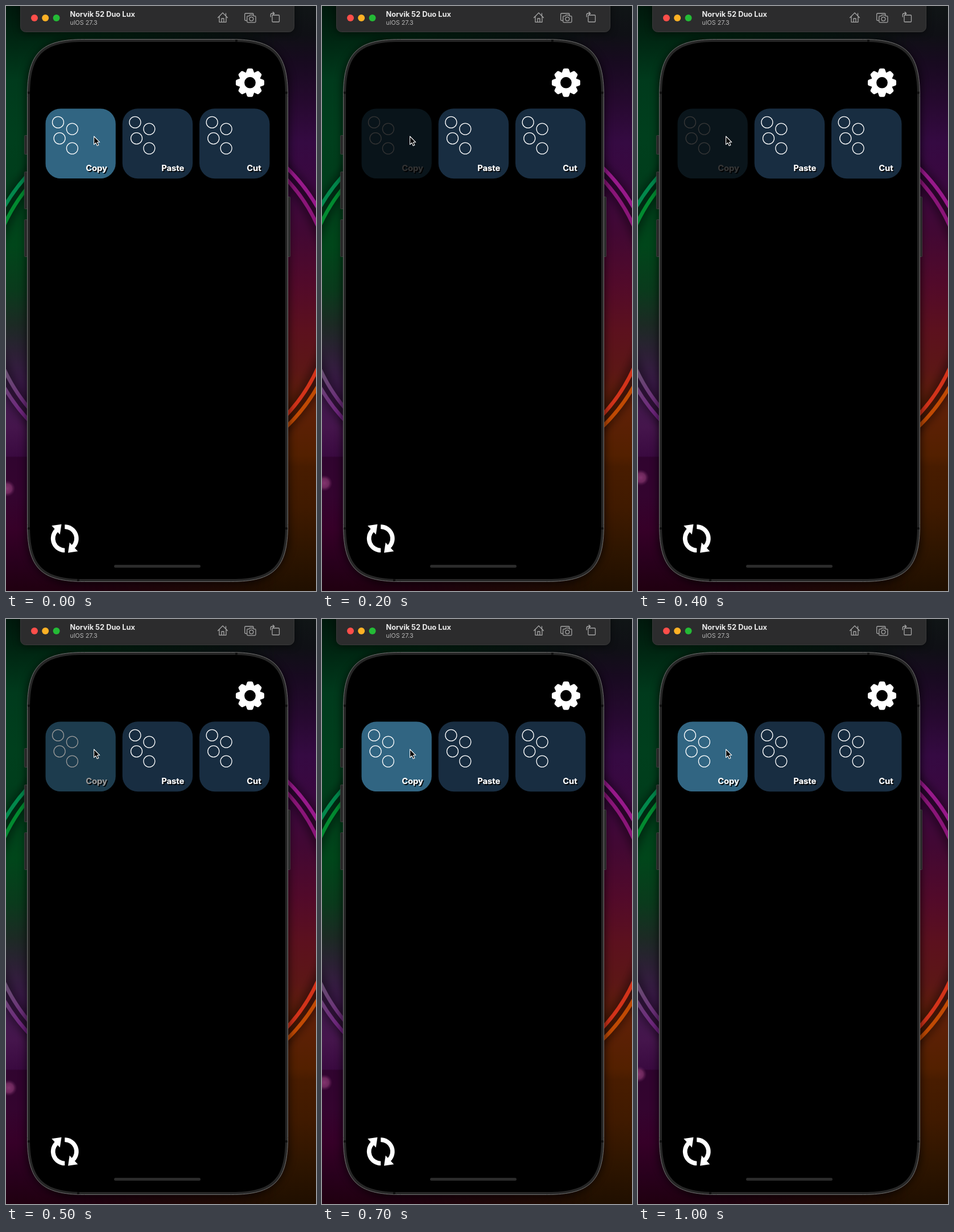
An HTML page that plays this animation: 545x1028 px, repeating every 1100 ms.

```html
<!DOCTYPE html>
<html lang="en">
<head>
<meta charset="utf-8">
<title>Simulator</title>
<style>
  html, body { margin: 0; width: 100%; height: 100%; overflow: hidden; background: #000; }
  .stage { position: relative; width: 545px; height: 1028px; overflow: hidden; }
  .stage > * { position: absolute; inset: 0; }
  .cool {
    background: linear-gradient(#00180c, #002411 50px, #003a1c 130px, #003f1d 230px, #003d1b 320px,
      #00461a 420px, #0a3a1c 500px, #1c2a24 560px, #2c2035 610px, #3e1a4c 670px, #45154c 740px,
      #3a0a40 791px, #30042f 793px, #34042f 860px, #360028 920px, #28001c 980px, #200010);
  }
  .warm {
    background: linear-gradient(#101516, #0f1015 50px, #180a20 100px, #26092f 170px, #350a42 240px,
      #3a0840 310px, #420833 400px, #520a2a 490px, #5c111e 570px, #5c1716 640px, #602008 700px,
      #532000 790px, #481c00 810px, #401a00 880px, #2e1500 960px, #200f00);
    -webkit-mask-image: linear-gradient(90deg, transparent 25%, #000 88%);
    mask-image: linear-gradient(90deg, transparent 25%, #000 88%);
  }
  text { font-family: Inter, "Noto Sans", sans-serif; }
  .label { font-size: 14.7px; font-weight: 700; fill: #fff; text-anchor: end; }
  .icon { fill: none; stroke: #a6a6a6; stroke-width: 1.3; stroke-linejoin: round; stroke-linecap: round; }

  .press { animation: press 1.1s step-end infinite; }
  .rise  { animation: rise 1.1s steps(11) infinite; }
  .sway  { animation: sway 1.1s step-end infinite; }

  @keyframes press {
    0%     { opacity: 1; }
    9.09%  { opacity: .5; }
    18.18% { opacity: .2; }
    36.36% { opacity: .215; }
    45.45% { opacity: .6; }
    54.54% { opacity: .98; }
    63.63% { opacity: 1; }
  }
  @keyframes rise { to { transform: translateY(-52.8px); } }
  @keyframes sway {
    0%     { transform: none; }
    9.09%  { transform: translateX(1.2px); }
    18.18% { transform: translateX(2px); }
    36.36% { transform: translateX(3px); }
    63.63% { transform: translateX(2px); }
    72.72% { transform: translateX(1.2px); }
    81.81% { transform: none; }
    90.9%  { transform: translateX(-1px); }
  }
</style>
</head>
<body>
<div class="stage">
  <div class="cool"></div>
  <div class="warm"></div>
  <svg width="545" height="1028" viewBox="0 0 545 1028">
    <defs>
      <filter id="soft" x="-20%" y="-20%" width="140%" height="140%"><feGaussianBlur stdDeviation="7"/></filter>
      <filter id="drop" x="-20%" y="-20%" width="150%" height="160%">
        <feDropShadow dx="1.8" dy="1.8" stdDeviation=".5" flood-color="#000"/>
      </filter>
      <radialGradient id="glow">
        <stop offset="0" stop-color="#8c3a76" stop-opacity=".9"/>
        <stop offset=".55" stop-color="#82356c" stop-opacity=".75"/>
        <stop offset="1" stop-color="#5c1c54" stop-opacity="0"/>
      </radialGradient>
      <linearGradient id="violet" gradientUnits="userSpaceOnUse" x1="0" y1="635" x2="36" y2="725">
        <stop offset="0" stop-color="#66506f"/><stop offset="1" stop-color="#702080"/>
      </linearGradient>
      <g id="dots" fill="none" stroke="#fff" stroke-width="1.3">
        <circle cx="22.2" cy="24.2" r="10"/>
        <circle cx="47.1" cy="35.9" r="10"/>
        <circle cx="24.8" cy="52.4" r="10"/>
        <circle cx="47.1" cy="69.9" r="10"/>
      </g>
      <rect id="tile" width="123.5" height="123" rx="27"/>
      <path id="tooth" d="M-7.6,-16.5 L-5.2,-23.2 Q-4.6,-25 -2.8,-25 H2.8 Q4.6,-25 5.2,-23.2 L7.6,-16.5 Z"/>
      <g id="turn">
        <path d="M0,20.7 A20.7,20.7 0 0 1 -14.6,-14.6" fill="none" stroke="#fff" stroke-width="7.6"/>
        <path d="M-23,-22.5 L-5.8,-25 L-8.5,-7 Z" fill="#fff"/>
      </g>
    </defs>

    <!-- neon rings, seen only beside the phone -->
    <circle cx="272" cy="511.5" r="309" fill="none" stroke="#000" stroke-opacity=".35" stroke-width="34" filter="url(#soft)"/>
    <g fill="none" stroke-width="6.5" transform="translate(272 511.5)">
      <path d="M-317.5,0 A317.5,317.5 0 0 1 0,-317.5" stroke="#02884c"/>
      <path d="M-303,0 A303,303 0 0 1 0,-303" stroke="#028a30"/>
      <path d="M0,-317.5 A317.5,317.5 0 0 1 317.5,0" stroke="#97198a"/>
      <path d="M0,-303 A303,303 0 0 1 303,0" stroke="#8a1578"/>
      <path d="M317.5,0 A317.5,317.5 0 0 1 0,317.5" stroke="#c04a04"/>
      <path d="M303,0 A303,303 0 0 1 0,303" stroke="#d2331a"/>
    </g>
    <path d="M272,829 A317.5,317.5 0 0 1 -45.5,511.5 M272,814.5 A303,303 0 0 1 -31,511.5" fill="none" stroke="url(#violet)" stroke-width="6.5"/>

    <g class="rise"><circle class="sway" cx="2" cy="848" r="14.5" fill="url(#glow)"/></g>

    <!-- toolbar -->
    <rect x="25" y="-14" width="482" height="62" rx="10" fill="#000" opacity=".5" filter="url(#soft)"/>
    <rect x="25.5" y="-20" width="481" height="65.5" rx="9" fill="#2c2c2d" stroke="#3a3a3a"/>
    <circle cx="50" cy="21" r="6" fill="#fe4e4a"/>
    <circle cx="69.2" cy="21" r="6" fill="#fdb125"/>
    <circle cx="88.6" cy="21" r="6" fill="#24bb36"/>
    <text x="112.5" y="19.4" font-size="12.8" font-weight="700" fill="#ececec">Norvik 52 Duo Lux</text>
    <text x="112.5" y="33" font-size="10.8" fill="#b6b6b6">ulOS 27.3</text>
    <g class="icon">
      <path d="M372.5,20.5 L381,12 L389.5,20.5 M375,18.5 V28.3 H387 V18.5 M379,28 V22 H383 V28 M386.5,17 V13"/>
      <path d="M422.5,25.5 H421 Q419.7,25.5 419.7,24 V14.5 Q419.7,13 421.2,13 H433.5 Q435,13 435,14.5 V16"/>
      <path d="M425.2,17.6 H427.5 L428.8,15.8 H434 L435.3,17.6 H437.6 Q439,17.6 439,19 V27.3 Q439,28.8 437.6,28.8 H425.2 Q423.8,28.8 423.8,27.3 V19 Q423.8,17.6 425.2,17.6 Z"/>
      <circle cx="431.4" cy="22.8" r="3.4"/>
      <rect x="468" y="16" width="12.5" height="12" rx="1.2"/>
      <path d="M465.3,19 V15.5 Q465.3,13 468,13 H471.5 M469.2,10.6 L471.8,13 L469.2,15.4"/>
    </g>

    <!-- phone body -->
    <rect x="35" y="58" width="463" height="958" rx="80" fill="#000" opacity=".6" filter="url(#soft)"/>
    <g fill="#272727" stroke="#454545" stroke-width=".8">
      <rect x="32.4" y="227.5" width="7" height="33" rx="1"/>
      <rect x="32.4" y="291.5" width="7" height="65" rx="1"/>
      <rect x="32.4" y="375.5" width="7" height="65" rx="1"/>
      <rect x="492" y="335.5" width="7.6" height="105" rx="1"/>
    </g>
    <!-- corners with continuous curvature -->
    <path fill="#262626" stroke="#727272" d="M37.5,158.5 c0,-76 24,-100 100,-100 H395.5 c76,0 100,24 100,100 V911.5 c0,76 -24,100 -100,100 H137.5 c-76,0 -100,-24 -100,-100 Z"/>
    <path d="M405,59 V63 M127,1007 V1011 M38,152.5 H42 M491,152.5 H495 M38,918 H42 M491,918 H495" stroke="#111" stroke-width="4"/>
    <path d="M42,158 c0,-72.5 22.5,-95 95,-95 H396 c72.5,0 95,22.5 95,95 V912 c0,72.5 -22.5,95 -95,95 H137 c-72.5,0 -95,-22.5 -95,-95 Z"/>

    <!-- gear -->
    <g transform="translate(429 134.7)" fill="#fff">
      <circle r="14.4" fill="none" stroke="#fff" stroke-width="9"/>
      <use href="#tooth"/>
      <use href="#tooth" transform="rotate(45)"/>
      <use href="#tooth" transform="rotate(90)"/>
      <use href="#tooth" transform="rotate(135)"/>
      <use href="#tooth" transform="rotate(180)"/>
      <use href="#tooth" transform="rotate(225)"/>
      <use href="#tooth" transform="rotate(270)"/>
      <use href="#tooth" transform="rotate(315)"/>
    </g>

    <!-- cards -->
    <g transform="translate(69.3 180.2)">
      <g class="press">
        <use href="#tile" fill="#316582"/>
        <use href="#dots"/>
        <text class="label" x="108.6" y="109.6" filter="url(#drop)">Copy</text>
      </g>
    </g>
    <g transform="translate(204.7 180.2)">
      <use href="#tile" fill="#182d41"/>
      <use href="#dots"/>
      <text class="label" x="108.6" y="109.6" filter="url(#drop)">Paste</text>
    </g>
    <g transform="translate(340 180.2)">
      <use href="#tile" fill="#182d41"/>
      <use href="#dots"/>
      <text class="label" x="108.6" y="109.6" filter="url(#drop)">Cut</text>
    </g>

    <path d="M154.6,229 V243.4 L157.9,240.3 L160.2,245.6 L162.8,244.5 L160.5,239.3 H164.8 Z" fill="#000" stroke="#fff" stroke-width="1.1" stroke-linejoin="round"/>

    <!-- refresh -->
    <g transform="translate(103.3 935.8)">
      <use href="#turn"/>
      <use href="#turn" transform="rotate(180)"/>
    </g>

    <rect x="190" y="982" width="152" height="5" rx="2.5" fill="#2b2b2b"/>
  </svg>
</div>
</body>
</html>
```
